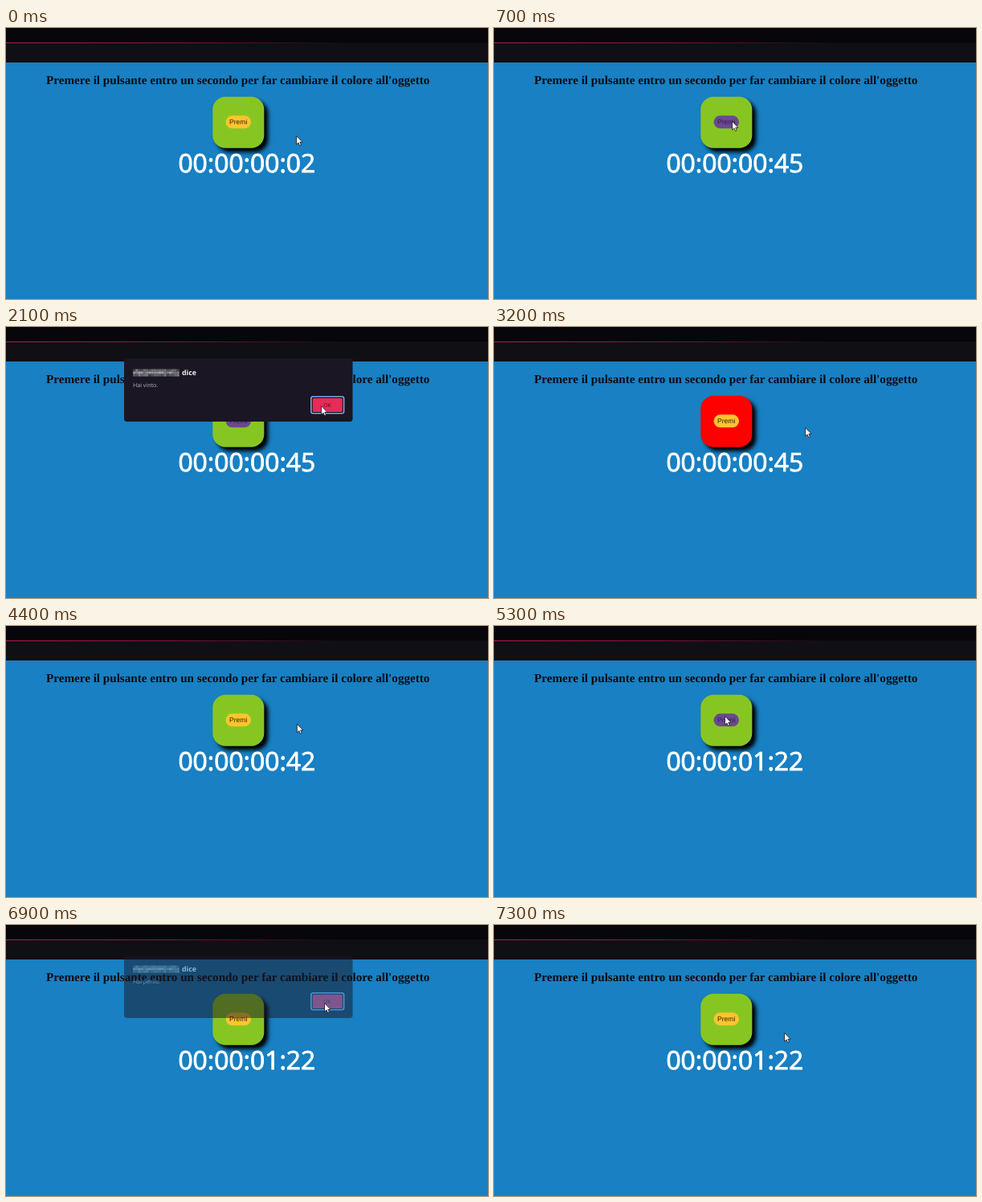
Recreate the animation shown at these times as an HTML page. Size 600 px wide and 338 px high, loop 7700 ms.

```html
<!DOCTYPE html>
<html lang="it">
<head>
<meta charset="utf-8">
<style>
  html, body { margin: 0; width: 100%; height: 100%; overflow: hidden; background: #1880c3; }
  svg { display: block; width: 100vw; height: 100vh; text-rendering: geometricPrecision; }
  .sans { font-family: "Open Sans", "Noto Sans", sans-serif; }
  #cube { filter: drop-shadow(5px 5px 2.6px #000); }
</style>
</head>
<body>
<svg viewBox="0 0 600 338">
  <defs>
    <linearGradient id="glow">
      <stop offset="0" stop-color="#b8174a"/>
      <stop offset=".35" stop-color="#86143a"/>
      <stop offset=".7" stop-color="#0d0b11"/>
    </linearGradient>
  </defs>
  <rect width="600" height="338" fill="#1880c3"/>
  <rect width="600" height="43" fill="#100f15"/>
  <rect width="600" height="18" fill="#07060b"/>
  <rect y="18" width="600" height="1" fill="url(#glow)"/>

  <text x="50" y="70" font-family="'Liberation Serif', serif" font-weight="700" font-size="15.14" fill="#0a0c14">Premere il pulsante entro un secondo per far cambiare il colore all'oggetto</text>

  <rect id="cube" x="257.3" y="85.8" width="64" height="64" rx="16"/>
  <rect id="push" x="273.5" y="109.3" width="31.5" height="16" rx="8"/>
  <text id="label" x="289.2" y="120.3" text-anchor="middle" font-family="'Liberation Sans', sans-serif" font-size="8.5">Premi</text>
  <text id="clock" class="sans" x="299.8" y="180" text-anchor="middle" font-size="31.8" fill="#fff" stroke="#fff" stroke-width=".9"></text>

  <g id="dialog" class="sans">
    <rect x="147" y="39" width="284.5" height="79" rx="3.5" fill="#1b1623"/>
    <g id="mosaic"></g>
    <text x="219" y="60" font-weight="700" font-size="8.8" fill="#f4f3f6">dice</text>
    <text id="message" x="158" y="75" font-size="7.1" fill="#bab8c0"></text>
    <rect x="379.8" y="86.8" width="40.8" height="21" rx="2.5" fill="#14111b" stroke="#70a9e6" stroke-width="1.6"/>
    <rect id="ok" x="381.7" y="88.7" width="37" height="17.2" rx="1.5"/>
    <text x="400" y="100" text-anchor="middle" font-size="7" fill="#5c1029">OK</text>
  </g>

  <path id="cursor" d="M-.5-.4V10.2L2 8 3.6 11.6 5.4 10.8 3.8 7.3H7Z" fill="#fff" stroke="#15151c" stroke-width=".8"/>
</svg>
<script>
const LOOP = 7700, STEP = 100;
const home = [362, 135], rest = [388, 126];

// Each round: run the clock, press the button, confirm the dialog, move away
const win = {
  start: 0, ticks: 45, open: 700, close: 2400, end: 3200,
  from: home, push: [297, 117], ok: [393, 99], to: rest,
  message: "Hai vinto.", color: "#ff0000"
};
const loss = {
  start: 4000, ticks: 122, open: 5300, close: 6800, end: 7300,
  from: rest, push: [288, 113], ok: [397, 98], to: home,
  message: "Hai perso.", color: "#87c622"
};

const $ = id => document.getElementById(id);
const set = (id, name, value) => $(id).setAttribute(name, value);
const progress = (t, a, b) => Math.min(1, Math.max(0, (t - a) / (b - a)));
const pad = n => String(Math.floor(n)).padStart(2, "0");

function glide(a, b, u) {
  const e = u * u * (3 - 2 * u);
  return a.map((v, i) => v + (b[i] - v) * e);
}

function pointer(t, r) {
  let p = glide(r.from, r.push, progress(t, r.start, r.start + r.ticks * 10));
  p = glide(p, r.ok, progress(t, r.open + 200, r.close - 400));
  return glide(p, r.to, progress(t, r.end - 300, r.end));
}

function over(id, [x, y]) {
  const box = $(id).getBBox();
  return x >= box.x && x <= box.x + box.width && y >= box.y && y <= box.y + box.height;
}

function buildMosaic() {
  let seed = 7;
  for (let i = 0; i < 54; i++) {
    seed = seed * 16807 % 2147483647;
    const row = Math.floor(i / 18);
    const v = Math.round((row === 1 ? 105 : 65) + seed / 2147483647 * 65);
    const cell = document.createElementNS("http://www.w3.org/2000/svg", "rect");
    const attrs = { x: 158 + i % 18 * 3.2, y: 52.5 + row * 3, width: 3.3, height: 3.1, fill: `rgb(${v},${v},${v + 4})` };
    for (const name in attrs) cell.setAttribute(name, attrs[name]);
    $("mosaic").append(cell);
  }
}

function draw(now) {
  const t = Math.floor(now % LOOP / STEP) * STEP;
  const r = t < loss.start ? win : loss;
  const tip = pointer(t, r);

  const ticks = Math.min(r.ticks, 2 + (t - r.start) / 10);
  $("clock").textContent = `00:00:${pad(ticks / 100)}:${pad(ticks % 100)}`;

  const closing = progress(t, r.close, r.close + 200);
  const alpha = progress(t, r.open, r.open + 200) * (1 - closing);
  const shift = -4 * (1 - progress(t, r.open, r.open + 400) + closing);
  set("dialog", "opacity", alpha);
  set("dialog", "transform", `translate(0 ${shift})`);
  $("message").textContent = r.message;
  set("ok", "fill", over("ok", tip) ? "#e62c58" : "#ff1a4e");

  const hover = alpha > .9 || over("push", tip);
  set("cube", "fill", t > r.close ? r.color : "#87c622");
  set("push", "fill", hover ? "#6b4893" : "#fdc52b");
  set("label", "fill", hover ? "#2d1d40" : "#25200f");

  set("cursor", "transform", `translate(${tip})`);
  requestAnimationFrame(draw);
}

buildMosaic();
requestAnimationFrame(draw);
</script>
</body>
</html>
```
